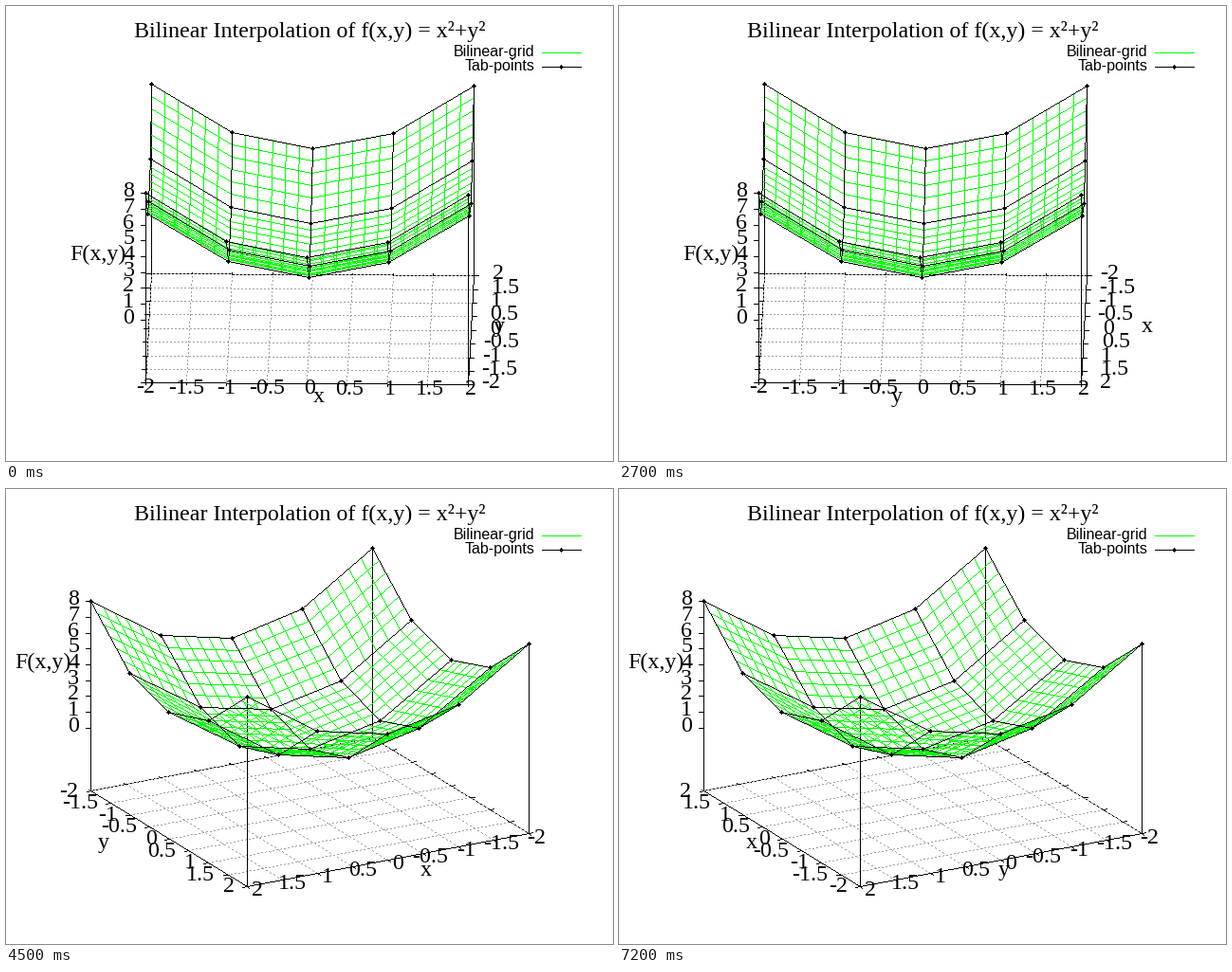
A matplotlib script for the animation above (8 s loop, 640 by 480 pixels).

```python
import math

import numpy as np
import matplotlib.pyplot as plt
from matplotlib.animation import ArtistAnimation

W, H, DPI = 640, 480, 100
PX = 72 / DPI                  # one pixel in points
CX, CY = 320, 340.8            # centre of the base plane
SX, SY = 169.8, 57.6           # half extents of the base plane
Z_UNIT, Z_LIFT = 200 / 12, 200 / 3
FRAMES, INTERVAL, HOLD = 80, 100, 9

ENDS = (-2, 2)
NODES = np.arange(-2, 3)
TICKS = np.arange(-2, 2.1, 0.5)
TICK_LEN = 0.06
SUB = 6                        # grid lines per table cell
BLACK, GREEN, GRAY = (0, 0, 0), (0, 255, 0), (160, 160, 160)

# Axis title shifts for the left and right front edge of each view
TITLE_SHIFT = [((13, 13), (67, -4)), ((-13, 10), (59, 4)), ((-32, 4), (40, 10))]

plt.rcParams["font.family"] = "Liberation Serif"
fig = plt.figure(figsize=(W / DPI, H / DPI), dpi=DPI, facecolor="white")
ax = fig.add_axes([0, 0, 1, 1])


class Canvas:
    """Raster for hard one-pixel lines without smoothing."""

    def __init__(self):
        self.rgb = np.full((H, W, 3), 255, np.uint8)

    def line(self, p, q, color=BLACK, dotted=False):
        p, q = np.rint(p), np.rint(q)
        n = int(max(abs(q - p)))
        k = np.arange(n + 1)
        x, y = np.floor(p[:, None] + (q - p)[:, None] * k / max(n, 1) + 0.5).astype(int)
        on = k % 4 < 2 if dotted else k >= 0
        self.rgb[y[on], x[on]] = color

    def lines(self, segs, color=BLACK, dotted=False):
        for p, q in segs:
            self.line(p, q, color, dotted)

    def diamond(self, p, r=2):
        x, y = np.rint(p).astype(int)
        for d in range(-r, r + 1):
            w = r - abs(d)
            self.rgb[y + d, x - w:x + w + 1] = BLACK

    def show(self):
        return ax.imshow(self.rgb, interpolation="nearest", aspect="auto")


def text(x, y, s, ha="center", size=24, **kw):
    """Text whose digits are centred vertically on y."""
    return ax.text(x, y + size / 3, s, ha=ha, va="baseline",
                   fontsize=size * PX, **kw)


def height(s, t):
    """Piecewise bilinear interpolant of s² + t²."""
    return np.interp(s, NODES, NODES ** 2) + np.interp(t, NODES, NODES ** 2)


class View:
    def __init__(self, angle):
        self.c = math.cos(math.radians(angle))
        self.s = math.sin(math.radians(angle))

    def base(self, s, t):
        return (CX + SX * (s * self.c + t * self.s) / 2,
                CY + SY * (s * self.s - t * self.c) / 2)

    def surf(self, s, t):
        x, y = self.base(s, t)
        return x, y - Z_LIFT - Z_UNIT * height(s, t)

    def direction(self, s, t):
        dx, dy = SX * (s * self.c + t * self.s), SY * (s * self.s - t * self.c)
        n = math.hypot(dx, dy)
        return dx / n, dy / n


def mesh(point, values, knots):
    """Segments of constant s and constant t through the given values."""
    segs = []
    for v in values:
        for a, b in zip(knots[:-1], knots[1:]):
            segs += [(point(v, a), point(v, b)), (point(a, v), point(b, v))]
    return segs


def tick_marks(view):
    segs = []
    for v in TICKS:
        for e in ENDS:
            out = e + math.copysign(TICK_LEN, e)
            segs += [(view.base(v, e), view.base(v, out)),
                     (view.base(e, v), view.base(out, v))]
    return segs


def axis_label(pos, out, value):
    """Tick label pushed outwards; positive numbers keep a blank for the sign."""
    ux, uy = out
    blank = 0 if value < 0 else 6
    y = pos[1] + min(2.5, 12 * uy - 4.5)
    if ux > 0.9:
        x, ha = pos[0] + 13.5 * ux + blank, "left"
    elif ux < -0.9:
        x, ha = pos[0] + 13.5 * ux, "right"
    else:
        x, ha = pos[0] + 9 * ux + blank / 2, "center"
    return text(x, y, f"{value + 0.0:g}", ha)


def draw_labels(view, kind, quarter):
    art = []
    left_sign = 1 if quarter < 2 else -1
    right_sign = 1 if quarter in (0, 3) else -1
    names = "xy" if quarter % 2 == 0 else "yx"

    for v in TICKS:
        art.append(axis_label(view.base(v, -2), view.direction(0, -1), left_sign * v))
        art.append(axis_label(view.base(2, v), view.direction(1, 0), right_sign * v))

    mids = view.base(0, -2), view.base(2, 0)
    for name, mid, (dx, dy) in zip(names, mids, TITLE_SHIFT[kind]):
        dx -= 37 if name == "y" else 0
        art.append(text(mid[0] + dx - 0.5, mid[1] + dy - 2, name))

    x, y = view.base(-2, -2)
    y -= Z_LIFT
    art += [text(x - 12.5, y - Z_UNIT * k - 4.5, str(k), "right") for k in range(9)]
    art.append(text(x - 51, y - 4 * Z_UNIT - 4.5, "F(x,y)"))
    return art


def draw_key(canvas):
    for y, color in ((49, GREEN), (64, BLACK)):
        canvas.line((565, y), (606, y), color)
    canvas.diamond((585, 64))


def scene(n):
    kind, quarter = n % 3, n // 3
    view = View(1 + 30 * kind)
    canvas = Canvas()

    edges = mesh(view.base, ENDS, ENDS)
    posts = [(view.base(s, t), view.surf(s, t)) for s in ENDS for t in ENDS]
    x, y = view.base(-2, -2)
    z_ticks = [((x - 5, y - Z_LIFT - Z_UNIT * k), (x, y - Z_LIFT - Z_UNIT * k))
               for k in range(9)]
    front = [(view.base(-2, -2), view.base(2, -2)),
             (view.base(2, -2), view.base(2, 2))]

    canvas.lines(edges)
    canvas.lines(mesh(view.base, TICKS, ENDS), GRAY, dotted=True)
    canvas.lines(front + posts + tick_marks(view) + z_ticks)
    canvas.lines(mesh(view.surf, np.linspace(-2, 2, 4 * SUB + 1), NODES), GREEN)
    canvas.lines(mesh(view.surf, NODES, NODES))
    for s in NODES:
        for t in NODES:
            canvas.diamond(view.surf(s, t))
    draw_key(canvas)
    return [canvas.show()] + draw_labels(view, kind, quarter)


text(319.5, 25, "Bilinear Interpolation of f(x,y) = x²+y²")
for name, y in (("Bilinear-grid", 47.5), ("Tab-points", 62.5)):
    text(556.5, y, name, "right", 16, family="Liberation Sans")

scenes = [scene(n) for n in range(9)]
ax.set_xlim(-0.5, W - 0.5)
ax.set_ylim(H - 0.5, -0.5)
ax.axis("off")

anim = ArtistAnimation(fig, [scenes[i // HOLD] for i in range(FRAMES)],
                       interval=INTERVAL, repeat=True, repeat_delay=0)
plt.show()
```
